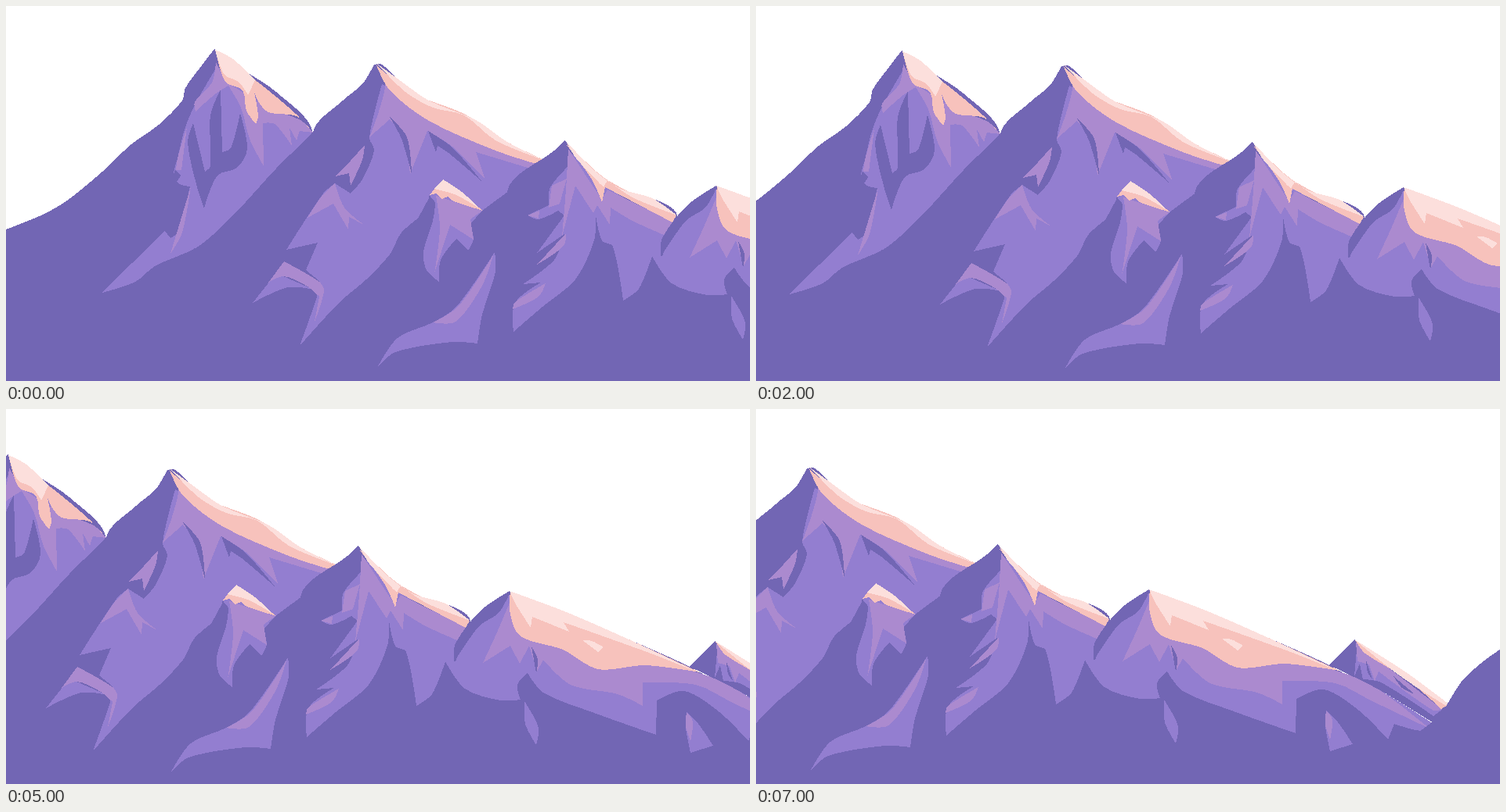
An HTML page that plays this animation: 950x480 px, repeating every 8 s.

```html
<!DOCTYPE html>
<html lang="en">
<head>
<meta charset="utf-8">
<title>Mountain range</title>
<style>
html, body { margin: 0; width: 100%; height: 100%; overflow: hidden; background: #fff; }
svg { display: block; width: 950px; height: 480px; shape-rendering: crispEdges; }
.dark { fill: #7266b4; }
.mid { fill: #937ed0; }
.mauve { fill: #ab8acf; }
.peach { fill: #f7c2bc; }
.pale { fill: #fcdfdc; }
#range { animation: pan 8s step-end infinite; }
@keyframes pan {
  0% { transform: translate(0, 0); }
  12.5% { transform: translate(-38px, 1px); }
  25% { transform: translate(-80px, 2px); }
  37.5% { transform: translate(-129px, 1px); }
  50% { transform: translate(-182px, 1px); }
  62.5% { transform: translate(-264px, 3px); }
  75% { transform: translate(-333px, 1px); }
  87.5%, 100% { transform: translate(-405px, 1px); }
}
</style>
</head>
<body>
<svg viewBox="0 0 950 480">
<g id="range">
  <!-- first mountain -->
  <polygon class="dark" points="0,286 47,267 78,249 123,212 160,177 195,152 225,121 229,105 250,76 266,55 300,80 345,110 392,162 420,490 0,490"/>
  <polygon class="mid" points="268,80 243,123 229,155 219,195 214,218 222,228 235,231 219,290 210,297 203,288 160,330 123,367 165,353 190,333 245,308 290,268 345,208 391,163 300,100"/>
  <polygon class="dark" points="274,107 261,140 261,205 254,212 239,150 232,175 244,232 253,259 270,217 295,207 308,183 299,137 287,182 276,187"/>
  <polygon class="dark" points="216,210 223,217 217,227 213,220"/>
  <polygon class="mauve" points="231,155 219,195 217,210 224,210"/>
  <polygon class="mauve" points="236,231 210,317 225,290"/>
  <polygon class="mauve" points="268,72 284,102 268,112 242,135 241,123 263,98"/>
  <polygon class="mauve" points="280,96 335,130 376,146 392,162 375,160 371,172 362,156 365,179 343,151 328,150 329,205 311,170 300,130"/>
  <polygon class="peach" points="268,58 325,100 370,138 391,161 371,141 335,136 322,122 317,110 322,141 319,151 307,134 302,108 280,97"/>
  <polygon class="pale" points="267,56 290,68 318,95 309,114 297,97 279,88"/>

  <!-- second mountain -->
  <polygon class="dark" points="392,162 430,121 455,100 470,75 480,75 500,93 540,121 600,146 640,174 686,198 700,490 380,490"/>
  <polygon class="mid" points="480,100 464,168 470,185 455,222 440,240 420,227 405,240 358,312 398,303 383,338 400,352 397,372 375,435 425,380 460,350 490,318 505,290 540,258 541,242 555,232 608,262 686,204 600,165"/>
  <polygon class="mauve" points="476,80 485,95 476,135 464,168 490,145 508,170 516,215 538,160 570,180 612,222 600,187 683,212 687,204 570,148"/>
  <polygon class="dark" points="490,142 512,168 518,215 505,170"/>
  <polygon class="dark" points="539,160 570,181 607,224 565,188 551,179 549,187"/>
  <polygon class="mauve" points="458,178 440,198 421,218 438,214 440,230 455,197"/>
  <polygon class="mauve" points="420,227 402,245 385,271 418,253 437,286 438,270 457,280 432,258"/>
  <polygon class="mid" points="345,342 315,380 360,360 393,363"/>
  <polygon class="mauve" points="355,327 400,353 406,365 394,404 400,372 385,359 355,346 335,354"/>
  <polygon class="peach" points="473,76 520,112 585,138 640,174 687,197 683,204 625,185 540,147 490,108"/>
  <polygon class="pale" points="474,74 500,93 540,121 600,146 640,174 686,197 625,172 585,140 545,130 510,110"/>

  <!-- snowy rock -->
  <polygon class="mid" points="541,242 547,265 533,315 537,338 553,353 555,325 575,298 590,313 597,298 592,280 608,262 555,236"/>
  <polygon class="dark" points="541,244 548,252 546,265 526,272"/>
  <polygon class="mauve" points="549,243 608,262 593,273 597,299 567,280 547,342 554,285"/>
  <polygon class="peach" points="541,242 548,233 575,238 609,262 572,250 564,244 557,247 549,240"/>
  <polygon class="pale" points="547,234 558,222 582,238 606,260 575,242"/>
  <polygon class="mid" points="624,315 575,385 545,405 500,425 474,463 497,443 570,430 602,432 608,395 625,340"/>
  <polygon class="mauve" points="622,319 577,385 545,405 574,404 608,358"/>

  <!-- third mountain -->
  <polygon class="dark" points="640,237 700,185 714,172 752,211 785,234 825,246 857,268 870,490 640,490"/>
  <polygon class="mid" points="718,185 723,200 695,232 693,255 666,268 680,273 705,262 713,268 678,316 713,292 700,325 660,356 683,354 650,380 648,417 685,385 727,350 751,300 753,268 761,300 775,308 788,377 808,362 825,320 838,320 853,274 780,240"/>
  <polygon class="mauve" points="697,230 716,221 707,253 693,258"/>
  <polygon class="mauve" points="681,262 666,268 680,272"/>
  <polygon class="mauve" points="715,291 712,307 678,331"/>
  <polygon class="mauve" points="689,355 650,379 647,388 680,372"/>
  <polygon class="mauve" points="718,183 761,248 768,235 852,277 840,293 800,275 772,258 771,280 755,255 750,265 727,230 710,295 715,235"/>
  <polygon class="peach" points="716,178 748,222 761,251 765,232 851,277 856,268 767,222 725,185"/>
  <polygon class="pale" points="715,173 752,211 785,234 825,246 857,268 800,245 768,223 763,232 728,195"/>

  <!-- fourth mountain -->
  <polygon class="dark" points="836,321 838,297 870,255 907,230 977,256 1055,290 1150,334 1250,400 1320,490 836,490"/>
  <polygon class="mid" points="906,235 852,290 838,320 825,320 850,355 895,370 921,369 917,350 930,335 950,360 1015,386 1094,414 1095,370 1130,358 1175,385 1212,422 1220,402 1256,411 1270,402 1200,358 1150,335 1030,300"/>
  <polygon class="dark" points="908,231 870,255 838,297 836,321 868,275 893,258"/>
  <polygon class="mauve" points="907,245 890,285 873,322 908,300 920,323 932,300 942,333 950,318 985,350 1045,362 1077,377 1077,347 1145,350 1190,372 1265,408 1200,358 1150,335 1040,310"/>
  <polygon class="dark" points="935,301 943,318 941,335"/>
  <polygon class="peach" points="908,231 907,255 920,287 975,305 1020,330 1080,325 1150,334 1055,290 977,257"/>
  <polygon class="pale" points="907,230 977,256 1055,290 1143,332 1085,309 976,270 983,282 936,263 934,277 915,247"/>
  <polygon class="pale" points="1000,293 1012,294 1027,302 1020,308"/>
  <polygon class="mid" points="926,371 927,400 941,427 944,405"/>
  <polygon class="mid" points="1133,385 1132,405 1138,437 1167,428 1148,400"/>
  <polygon class="mauve" points="1133,385 1132,403 1138,422 1141,397"/>

  <!-- fifth mountain -->
  <polygon class="dark" points="1137,327 1169,294 1235,336 1290,377 1270,401 1200,358"/>
  <polygon class="mid" points="1172,308 1169,341 1176,325 1180,345 1203,349 1270,392 1282,383"/>
  <polygon class="mauve" points="1171,298 1173,322 1188,326 1195,347 1200,335 1270,385 1281,383"/>
  <polygon class="dark" points="1184,320 1192,345 1186,336"/>
  <polygon class="dark" points="1219,341 1246,364 1230,356"/>
  <polygon class="peach" points="1170,295 1183,312 1235,344 1280,383 1290,377 1235,337"/>
  <polygon class="pale" points="1169,294 1235,336 1290,377 1285,378 1225,339"/>

  <!-- near slope -->
  <polygon class="dark" points="1356,306 1330,325 1305,349 1278,391 1250,413 1300,490 1356,490"/>
</g>
</svg>
<script>
// Round the gentle bends of a polygon, keep its sharp corners.
function smooth(pts) {
  const n = pts.length;
  const unit = (a, b) => {
    const dx = b.x - a.x, dy = b.y - a.y, len = Math.hypot(dx, dy);
    return { x: dx / len, y: dy / len, len };
  };
  const dirs = pts.map((p, i) => {
    const prev = pts[(i + n - 1) % n], next = pts[(i + 1) % n];
    const a = unit(prev, p), b = unit(p, next);
    return a.x * b.x + a.y * b.y > 0.6 ? unit(prev, next) : { x: 0, y: 0 };
  });
  let d = `M${pts[0].x},${pts[0].y}`;
  pts.forEach((p, i) => {
    const j = (i + 1) % n, q = pts[j], h = unit(p, q).len * 0.3;
    d += `C${p.x + dirs[i].x * h},${p.y + dirs[i].y * h} ${q.x - dirs[j].x * h},${q.y - dirs[j].y * h} ${q.x},${q.y}`;
  });
  return d + 'Z';
}

for (const poly of document.querySelectorAll('polygon')) {
  const path = document.createElementNS('http://www.w3.org/2000/svg', 'path');
  path.setAttribute('class', poly.getAttribute('class'));
  path.setAttribute('d', smooth([...poly.points]));
  poly.replaceWith(path);
}
</script>
</body>
</html>
```
